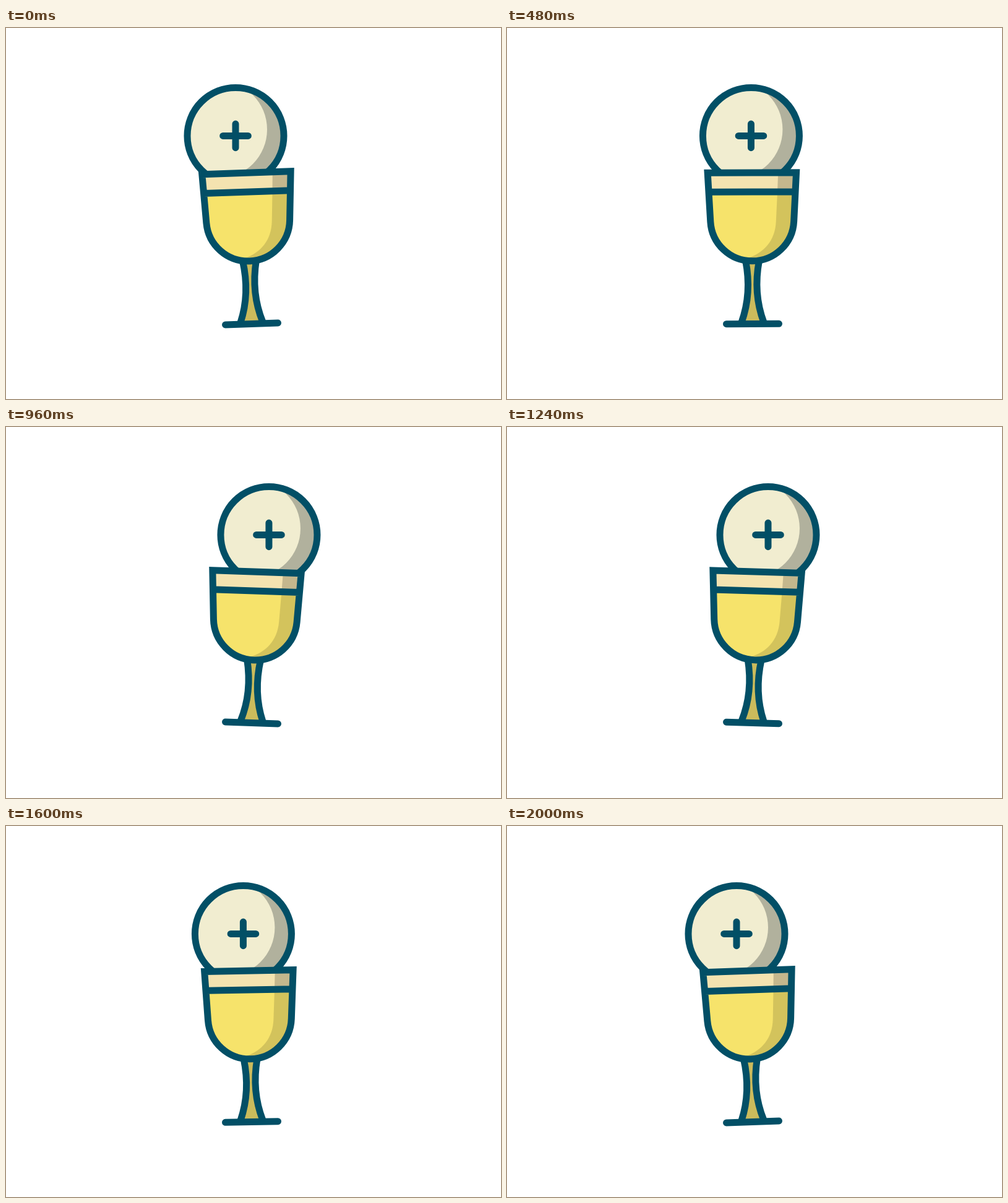
Write an HTML page that moves like this. It is 800 px wide and 600 px high and loops after 2040 ms.

```html
<!DOCTYPE html>
<html lang="en">
<head>
<meta charset="utf-8">
<title>Chalice and host</title>
<style>
  html, body { margin: 0; width: 100%; height: 100%; overflow: hidden; background: #fff; }
  svg { display: block; }
  .line { fill: none; stroke: #024f66; stroke-width: 11; }
  .round { stroke-linecap: round; }
</style>
</head>
<body>
<svg width="800" height="600" viewBox="0 0 800 600">
  <defs>
    <clipPath id="bowlClip">
      <path d="M325.3 234H468.7L464.4 313A67.5 67.5 0 0 1 329.6 313Z"/>
    </clipPath>
  </defs>

  <!-- Host, centred on its own origin -->
  <g id="host">
    <circle r="78" fill="#b1b19d"/>
    <clipPath id="hostClip"><circle r="78"/></clipPath>
    <circle cx="-28" cy="-10.3" r="79" fill="#f1edd0" clip-path="url(#hostClip)"/>
    <circle class="line" r="78"/>
    <path class="line round" d="M-20.3 0H20.3M0 -19.3V19.3"/>
  </g>

  <!-- Chalice, upright -->
  <g id="cup">
    <path fill="#cbbb5c" d="M386 376C391 402 393 438 379 476H415C401 438 403 402 408 376Z"/>
    <path class="line" d="M386 376C391 402 393 438 379 476M408 376C403 402 401 438 415 476"/>
    <g clip-path="url(#bowlClip)">
      <path fill="#f6e36b" d="M320 265H475V380H320Z"/>
      <path fill="#f4e3b0" d="M320 230H475V265H320Z"/>
      <path fill-opacity=".14" d="M438 265L435.5 313C434 345 415 364 390 372V380H475V265Z"/>
      <path fill="#c4b78d" d="M439.5 230L438 265H475V230Z"/>
    </g>
    <path class="line" d="M325.3 234H468.7L464.4 313A67.5 67.5 0 0 1 329.6 313ZM327 265H467"/>
    <path class="line round" d="M354.5 478.5H439.5"/>
  </g>
</svg>
<script>
  const LOOP = 2040, SWING = 1000, STEP = 40;
  const host = document.getElementById('host');
  const cup = document.getElementById('cup');

  // Symmetric ease, cubic-bezier(.7, 0, .3, 1)
  function ease(x) {
    let lo = 0, hi = 1;
    for (let i = 0; i < 30; i++) {
      const t = (lo + hi) / 2, u = 1 - t;
      if (2.1 * u * u * t + 0.9 * u * t * t + t ** 3 < x) lo = t;
      else hi = t;
    }
    return lo * lo * (3 - 2 * lo);
  }

  function draw(now) {
    const t = Math.floor(now % LOOP / STEP) * STEP;
    const p = t < SWING ? ease(t / SWING) : 1 - ease(Math.min(1, t / SWING - 1));
    host.setAttribute('transform', `translate(${371 + 54 * p} 174.4)`);
    cup.setAttribute('transform', `rotate(${4 * p - 2} 397 478.5)`);
  }

  const start = performance.now();
  function tick() {
    draw(performance.now() - start);
    requestAnimationFrame(tick);
  }
  tick();
</script>
</body>
</html>
```
